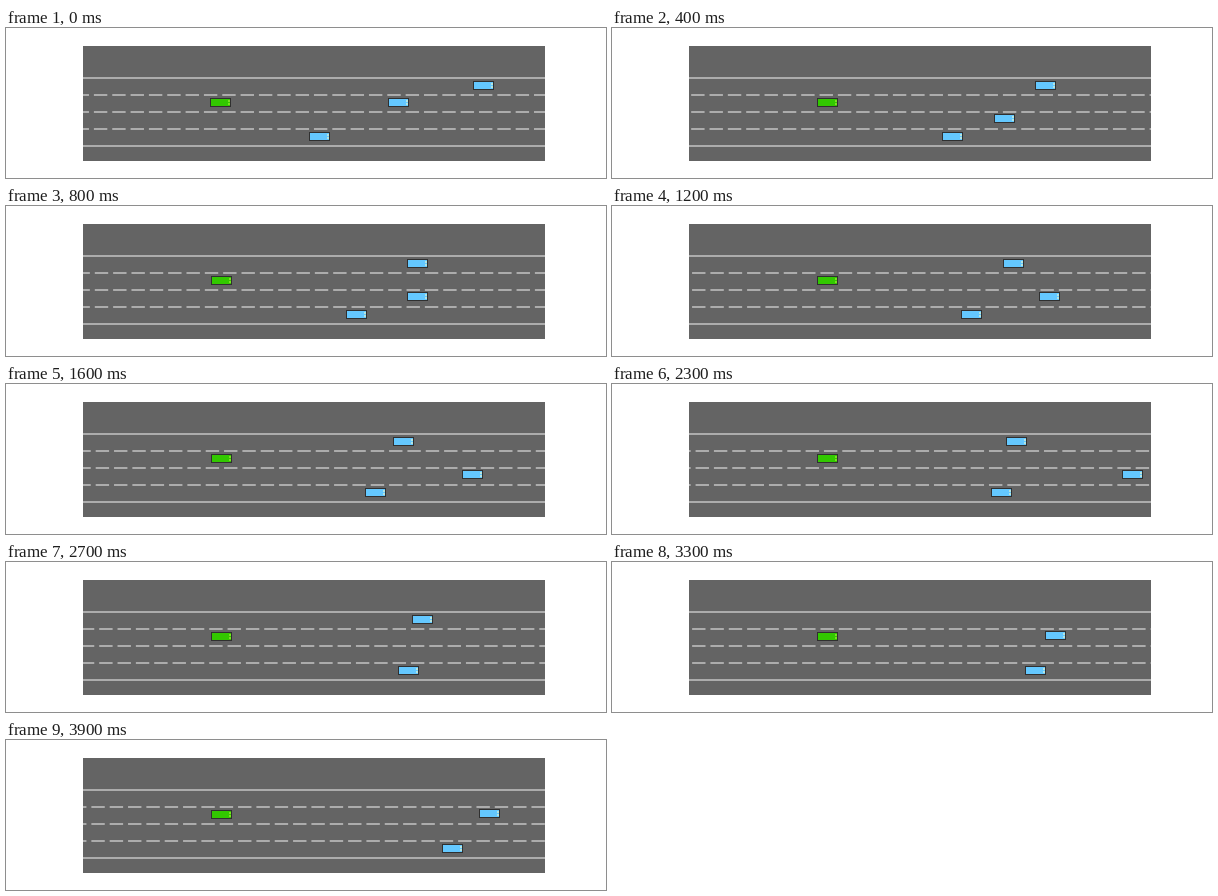
These frames come from a looping animation (600 px wide and 150 px high, 4 s). An HTML page with a canvas:

```html
<!DOCTYPE html>
<html lang="en">
<head>
<meta charset="utf-8">
<title>Highway</title>
<style>
  html, body { margin: 0; width: 100%; height: 100%; overflow: hidden; background: #fff; }
  canvas { display: block; }
</style>
</head>
<body>
<canvas id="stage" width="600" height="150"></canvas>
<script>
const ctx = document.getElementById('stage').getContext('2d');

const STEP = 100, STEPS = 40;
const ROAD = { x: 77, y: 18, w: 462, h: 115 };
const LANE = 17, TOP_LINE = 49, LANES = 4;
const SCALE = 4.235;                                // pixels per metre
const GAP = 4.33 * SCALE, DASH = 3 * SCALE + 0.7;
const TRAVEL = 20 * SCALE;                          // own car, per step
const CAR = { w: 21, h: 9 };
const LINE = '#acacac', OUTLINE = '#303030';
const BLUE = { body: '#64c8ff', lamp: '#b4e4e0' };
const GREEN = { body: '#32c800', lamp: '#78e020' };

// Steady drift and acceleration, plus a start-up term that fades out
const drift = (start, speed, accel, kick, fade) => n =>
  start + speed * n + accel * n * n + kick * Math.exp(-n / fade);

const keepLane = y => () => y;

// Eases into the next lane once the turn has begun
const changeLane = (from, to, turn) => n => {
  const k = Math.max(0, n - turn);
  return to + (from - to) * Math.exp(-k * (0.6 + 0.4 * Math.min(k, 2)));
};

const cars = [
  { paint: BLUE, x: drift(441, -5.42, 0.1667, 36.5, 3.4), y: changeLane(57.5, 73.5, 27) },
  { paint: BLUE, x: drift(349.7, 7, 0.018, 42.8, 3.6), y: changeLane(74.5, 90.5, 1) },
  { paint: BLUE, x: drift(337.1, 1.51, 0.0335, -23.3, 2), y: keepLane(108.5) },
  { paint: GREEN, x: drift(215.3, 0, 0, -0.8, 0.4), y: keepLane(74.5) }
];

function box(x, y, w, h, color) {
  ctx.fillStyle = color;
  ctx.fillRect(x, y, w, h);
}

function drawRoad(n) {
  box(ROAD.x, ROAD.y, ROAD.w, ROAD.h, '#646464');
  const first = 87.9 - 2 * GAP - (n * TRAVEL) % GAP;
  for (let i = 0; i <= LANES; i++) {
    const y = TOP_LINE + i * LANE;
    if (i % LANES === 0) box(ROAD.x, y, ROAD.w, 2, LINE);
    else for (let x = first; x < ROAD.x + ROAD.w; x += GAP) box(x, y, DASH, 2, LINE);
  }
}

function drawCar({ paint, x, y }, n) {
  const { w, h } = CAR;
  const left = Math.round(x(n) - w / 2), top = Math.round(y(n) - h / 2);
  box(left, top, w, h, OUTLINE);
  box(left + 1, top + 1, w - 2, h - 2, paint.body);
  for (const dy of [2, 5]) box(left + w - 3, top + dy, 2, 2, paint.lamp);
}

function draw(n) {
  ctx.clearRect(0, 0, 600, 150);
  ctx.save();
  ctx.beginPath();
  ctx.rect(ROAD.x, ROAD.y, ROAD.w, ROAD.h);
  ctx.clip();
  drawRoad(n);
  for (const car of cars) drawCar(car, n);
  ctx.restore();
}

const begin = performance.now();
function tick() {
  const t = Math.max(0, performance.now() - begin);
  draw(Math.floor(t / STEP) % STEPS);
  requestAnimationFrame(tick);
}
tick();
</script>
</body>
</html>
```
